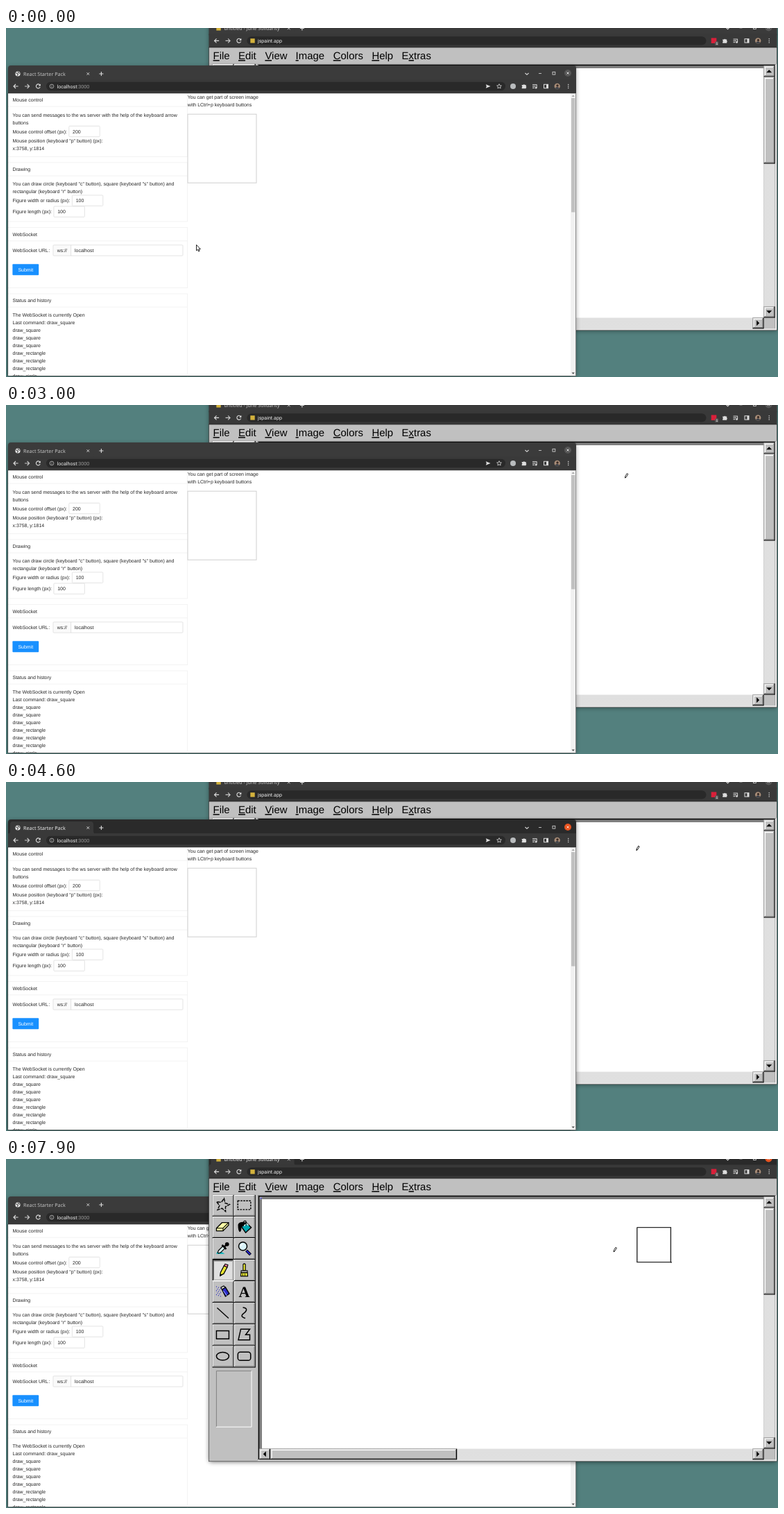
An HTML page that plays this animation: 1113x503 px, repeating every 8000 ms.

```html
<!DOCTYPE html>
<html lang="en">
<head>
<meta charset="utf-8">
<title>Remote drawing</title>
<style>
html, body { margin: 0; width: 100%; height: 100%; overflow: hidden; background: #53807e; }
svg { display: block; width: 1113px; height: 503px; }
text { font-family: "Liberation Sans", Arial, sans-serif; text-rendering: geometricPrecision; white-space: pre; }
.ui { font-family: "Noto Sans", sans-serif; }
.url { font-family: Roboto, sans-serif; }
.letter { font: bold 22px "Liberation Serif", serif; }
.strip, .tab { fill: #3b3b3b; }
.title { fill: #c4c4c4; }
.close { fill: #585858; }
.shade { opacity: .35; }
.on .strip { fill: #2a2a2a; }
.on .tab { fill: #393939; }
.on .title { fill: #eee; }
.on .close { fill: #e95420; }
.on .shade { opacity: .5; }
</style>
</head>
<body>
<svg id="stage" viewBox="0 0 1113 503" xmlns="http://www.w3.org/2000/svg"></svg>
<script>
const rect = (x, y, w, h, fill, more = '') =>
  `<rect x="${x}" y="${y}" width="${w}" height="${h}" fill="${fill}" ${more}/>`;
const frame = (x, y, w, h, color, sw = 1, more = '') =>
  rect(x, y, w, h, 'none', `stroke="${color}" stroke-width="${sw}" ${more}`);
const path = (d, stroke = '#000', sw = 1, fill = 'none', more = '') =>
  `<path d="${d}" stroke="${stroke}" stroke-width="${sw}" fill="${fill}" ${more}/>`;
const shape = (d, fill, more = '') => path(d, 'none', 0, fill, more);
const circle = (x, y, r, fill, more = '') =>
  `<circle cx="${x}" cy="${y}" r="${r}" fill="${fill}" ${more}/>`;
const label = (x, y, s, size = 6.97, fill = '#262626', more = '') =>
  `<text x="${x}" y="${y}" font-size="${size}" fill="${fill}" ${more}>${s}</text>`;
const at = (x, y, body) => `<g transform="translate(${x} ${y})">${body}</g>`;

// ---- browser chrome; origin: left edge, middle of the address row ----
function chrome(title, host, port, favicon, siteIcon, extension, extra) {
  const light = '#dedede';
  const puzzle = shape('M-3 -2H-1A1.2 1.2 0 0 1 1.2 -2H3V0A1.2 1.2 0 0 1 3 2V3.3H-3V1.6A1.2 1.2 0 0 0 -3 -.4Z', light);
  const list = path('M-3.5 -2.3H3M-3.5 0H1M-3.5 2.3H-.5', light) + path('M2.6 -2V2.2', light) + circle(1.6, 2.2, 1.3, light);
  const panel = frame(-3, -2.7, 6, 5.4, light, 1) + rect(.5, -2.7, 2.5, 5.4, light);
  const avatar = circle(0, 0, 4.2, '#a88d78') + circle(.3, -1, 1.7, '#3a2c26') + shape('M-3.2 2.7Q0 -.8 3.2 2.7Q0 5.5 -3.2 2.7', '#3a3f48');
  const dots = [-2.6, 0, 2.6].map(y => circle(0, y, .75, light)).join('');
  return '<path class="strip" d="M0 -8V-26Q0 -30 4 -30H815Q819 -30 819 -26V-8Z"/>'
    + '<path class="tab" d="M0 -9Q3 -10 3 -13V-23Q3 -27 7 -27H119Q123 -27 123 -23V-13Q123 -10 126 -9Z"/>'
    + at(14, -18, favicon)
    + `<text class="ui title" x="22" y="-15.5" font-size="7.15">${title}</text>`
    + path('M113.5 -19.8L117.1 -16.2M117.1 -19.8L113.5 -16.2', light, .9)
    + path('M131.4 -18H137.4M134.4 -21V-15', light, 1.1)
    + path('M745.5 -19L748 -16.7L750.5 -19', light, 1.1)
    + path('M765 -18.5H769', light, .8) + frame(785, -20.7, 3.8, 3.8, light, .8)
    + '<circle class="close" cx="807" cy="-19" r="5"/>'
    + path('M805.5 -20.5L808.5 -17.5M808.5 -20.5L805.5 -17.5', '#fff', .8)
    + rect(0, -10, 819, 20, '#393939')
    + rect(55, -6.2, 662, 12.4, '#292929', 'rx="6.2"')
    + path('M14.6 0H8M11 -3L8 0L11 3', light, 1.1)
    + path('M24 0H30.6M27.6 -3L30.6 0L27.6 3', '#c8c8c8', 1.1)
    + path('M45.9 -1.8A3 3 0 1 0 46.2 1', light, 1.1) + shape('M46.8 -3.6V-.5H43.7Z', light)
    + at(63, 0, siteIcon)
    + label(70.5, 2.5, `${host}<tspan fill="#9a9a9a">${port}</tspan>`, 7.1, '#eee', 'class="url"')
    + extra
    + at(728, 0, extension) + at(743.7, 0, puzzle) + at(759.5, 0, list)
    + at(775.5, 0, panel) + at(791.7, 0, avatar) + at(807.7, 0, dots);
}

const shadow = (x, y, w, h) => rect(x, y, w, h, '#000', 'rx="4" class="shade" filter="url(#blur)"');

// ---- page window ----
const card = (y, h, name) => frame(2.5, y, 259.2, h, '#f0f0f0', .8)
  + path(`M3 ${y + 19.2}H261.7`, '#f0f0f0', .8) + label(9.5, y + 12.4, name);
const input = (x, y, w, s) => frame(x, y, w, 15.4, '#d9d9d9', .7, 'rx="1"') + label(x + 5.3, y + 10.2, s);

function pageWindow() {
  const globe = circle(0, 0, 3.6, '#e8e8e8')
    + path('M-2.8 -1.2L-.8 -.6L.4 1L-1 2.6M.2 -3L1 -1.4L3 -.8', '#444', 1.1);
  const info = circle(0, 0, 2.9, 'none', 'stroke="#bbb" stroke-width=".8"') + path('M0 -.4V1.6M0 -1.7V-1', '#bbb', .8);
  const extra = shape('M688.8 -2.8L695.6 0L688.8 2.8L689.8 0Z', '#dedede')
    + path('M708 -3.4L709 -1.1L711.4 -.9L709.6 .7L710.1 3L708 1.8L705.9 3L706.4 .7L704.6 -.9L707 -1.1Z', '#dedede', .8);
  const rows = [
    [127.5, 'You can send messages to the ws server with the help of the keyboard arrow'],
    [138.5, 'buttons'], [151.6, 'Mouse control offset (px):'],
    [165.1, 'Mouse position (keyboard "p" button) (px):'], [176.1, 'x:3758, y:1814'],
    [227, 'You can draw circle (keyboard "c" button), square (keyboard "s" button) and'],
    [238, 'rectangular (keyboard "r" button)'], [251.2, 'Figure width or radius (px):'],
    [267.2, 'Figure length (px):'], [322.9, 'WebSocket URL'],
    [416, 'The WebSocket is currently Open'], [427, 'Last command: draw_square']];
  return shadow(3, 56, 819, 447)
    + '<g clip-path="url(#pageClip)">'
    + rect(3, 90, 819, 412, '#fff')
    + card(93.9, 91.4, 'Mouse control') + card(193.9, 85, 'Drawing')
    + card(287.6, 87, 'WebSocket') + card(383, 140, 'Status and history')
    + rows.map(([y, s]) => label(9.5, y, s)).join('')
    + label(61.8, 322.9, ':')
    + input(90.8, 141.3, 44.4, '200') + input(95.4, 241, 44.4, '100') + input(68.9, 257, 44.4, '100')
    + rect(68, 312.8, 25.6, 15.4, '#fafafa') + frame(68, 312.8, 187, 15.4, '#d9d9d9', .7, 'rx="1"')
    + path('M93.6 312.8V328.2', '#d9d9d9', .7) + label(73.7, 322.9, 'ws://') + label(99, 322.9, 'localhost')
    + rect(9.4, 340.2, 37.8, 16, '#1890ff', 'rx="1"') + label(17.4, 350.7, 'Submit', 7, '#fff')
    + '<g id="history"></g>'
    + label(261.8, 102, 'You can get part of screen image') + label(261.8, 113, 'with LCtrl+p keyboard buttons')
    + frame(262, 124.2, 99, 99, '#cfcfcf', 1)
    + rect(814, 94, 8, 408, '#f1f1f1') + rect(815, 101, 5.4, 164.5, '#c1c1c1')
    + shape('M815.6 99L817.7 96.6L819.8 99Z', '#a3a3a3')
    + shape('M815.6 496.6L817.7 499L819.8 496.6Z', '#505050')
    + '</g>'
    + at(3, 84, chrome('React Starter Pack', 'localhost', ':3000', globe, info, circle(0, 0, 4, '#b9bcbe'), extra))
    + frame(2.8, 94, 818.8, 407.8, '#2b2b2b', .5);
}

// ---- paint window ----
const px = 1.244; // one pixel of the enlarged paint interface

// nested boxes: low edge, top edge, inner low edge, inner top edge, face
function bevel(x, y, w, h, colors) {
  const [low, top, low2, top2, face] = colors;
  return rect(x, y, w, h, low) + rect(x, y, w - px, h - px, top)
    + rect(x + px, y + px, w - 2 * px, h - 2 * px, low2) + rect(x + px, y + px, w - 3 * px, h - 3 * px, top2)
    + rect(x + 2 * px, y + 2 * px, w - 4 * px, h - 4 * px, face);
}
const gray = '#c0c0c0', raisedTool = ['#000', '#fff', '#808080', gray, gray];
const pressedTool = ['#fff', '#000', gray, '#808080', 'url(#check)'];
const raisedBar = ['#000', '#dfdfdf', '#808080', '#fff', gray];
const bar = (x, y, w, h, turn) => bevel(x, y, w, h, raisedBar)
  + (turn ? at(x + w / 2 - .4, y + h / 2 - .3, shape('M-4 2L0 -2L4 2Z', '#000', `transform="rotate(${turn})"`)) : '');

function starPath(n, R, r) {
  let d = '';
  for (let i = 0; i < 2 * n; i++) {
    const a = i * Math.PI / n - Math.PI / 2 + .2, k = i % 2 ? r : R;
    d += (i ? 'L' : 'M') + (k * Math.cos(a)).toFixed(1) + ' ' + (k * Math.sin(a)).toFixed(1);
  }
  return d + 'Z';
}

const k = '#000';
let spray = '';
for (let i = 0; i < 13; i++) spray += rect(-9.5 + (i * 7 % 5) * 1.5, -7.5 + i * 1.15, 1.1, 1.1, '#2020c0');
const tools = [
  path(starPath(5, 10, 4.6), k, 1.4, 'none', 'stroke-dasharray="5 1.2"'),
  frame(-9.3, -6.3, 18.6, 12.6, k, 1.4, 'stroke-dasharray="2.6 1.4"'),
  path('M-9 2L-1 -6H8.5V-2.5L.5 6H-9Z', k, 1.3, '#ffffa6') + path('M-9 2H.5L8.5 -6M.5 2V6', k, 1.1),
  path('M-4 0L3 -6L10 1L2 8.5Z', k, 1.5, '#00a8b0') + path('M-1 -1L3.5 -4.5L6 -2', '#d8f4f4', 1.5)
    + shape('M-9 -3Q-8 -7 -2 -7L3 -6L-4 0Q-4 7 -6.5 7.5Q-9 6 -9 -3Z', k) + path('M-1 -1V-7Q0 -9.5 2.5 -8V-2', k, 1.1),
  shape('M-9 8H3L-2 5H-8Z', '#00b5bd') + path('M-7 6L-6 3L1 -4L4 -1L-3 6L-6 7Z', k, 1.2, '#d8f4f4')
    + path('M-1 -5L5 1M2 -2L7 -7', k, 2.4) + circle(6.3, -6, 2.9, k),
  path('M3 3L9 9', k, 4) + path('M3.4 3.4L8.6 8.6', '#2525d8', 2)
    + circle(-2, -3, 6, '#d9f3f8', 'stroke="#000" stroke-width="1.5"') + path('M-5 -3Q-4.5 -6 -2 -6', '#fff', 1.3),
  path('M-3.5 8L-3 3.5L2 -6L6.5 -4L1.5 5.5Z', k, 1.3, '#ffff3c') + path('M2 -6L3.4 -8.6L7.6 -7.2L6.5 -4Z', k, 1.1, '#ef7fa0')
    + path('M-.8 5.5L4 -4.6', '#b9a91d', .8) + shape('M-4.2 9.5L-3.8 5.5L-.4 7Z', k),
  path('M-1.6 1V-8Q0 -10 1.6 -8V1Z', k, 1.2, '#ffff3c') + rect(-4.5, 1, 9, 3, '#b8b8b8', 'stroke="#000" stroke-width="1.1"')
    + path('M-4.5 4H4.5L5 9H-5Z', k, 1.2, '#ffff3c') + path('M-2 5V9M1 5V9', k, .9),
  spray + path('M-1 -3L4 -6L9.5 3L4 7Z', k, 1.4, '#2a2ac8') + path('M1 -1L6 6', '#8f9cf5', 1.2)
    + path('M-2.5 -6L1.5 -8L4 -6L-1 -3Z', k, 1.1, '#d8d8d8'),
  '<text class="letter" y="7.6" text-anchor="middle">A</text>',
  path('M-8 -7.5L8.5 7.5', k, 1.4),
  path('M-2 -8Q4 -7.5 3 -4Q2 -1.5 -1 .5Q-5 3.5 -2.5 5.5Q-.5 7 1.5 7.5', k, 1.5),
  frame(-9, -5.6, 18, 11.6, k, 1.5),
  path('M-5 -8H8L2 0H8V7.5H-8.5Z', k, 1.5),
  '<ellipse rx="9" ry="5.8" fill="none" stroke="#000" stroke-width="1.5"/>',
  frame(-9.2, -6, 18.4, 12, k, 1.5, 'rx="3.4"')];

function paintWindow() {
  const mark = rect(-3.2, -3.2, 6.4, 6.4, '#d3b23c');
  const ext = rect(-3.8, -4, 7.6, 7.6, '#d9203a') + rect(1.6, 1, 5, 5.6, '#5c5c5c', 'rx="1"')
    + label(2.9, 5.7, '1', 5, '#fff');
  const menu = [[298.6, 'File'], [335, 'Edit'], [373.4, 'View'], [417.6, 'Image'],
    [471.8, 'Colors'], [527.4, 'Help'], [570.6, 'Extras', 1]];
  const menuText = menu.map(([x, s, i = 0]) => label(x, 45.1, s.slice(0, i)
    + `<tspan text-decoration="underline">${s[i]}</tspan>` + s.slice(i + 1), 12 * px, '#000')).join('');
  const size = 25 * px;
  const buttons = tools.map((icon, i) => {
    const x = 297.6 + i % 2 * size, y = 51.8 + (i >> 1) * size;
    return bevel(x, y, size, size, i === 6 ? pressedTool : raisedTool) + at(x + 14.8, y + 14.8, icon);
  }).join('');
  return shadow(292.5, -20, 819, 457)
    + rect(292.5, 26, 819, 410, gray)
    + at(292.5, 18.4, chrome('untitled - June Solidarity', 'jspaint.app', '', mark, mark, ext, ''))
    + menuText + buttons
    + path('M303.4 386V305.4H354', '#808080', 1) + path('M354 305.4V386.2H303', '#fff', 1)
    + bevel(362.7, 51.8, 748.5, 383.6, ['#fff', '#808080', '#dfdfdf', '#000', '#808080'])
    + rect(369, 58, 723.5, 360, '#fff')
    + rect(366, 55, 3, 3, '#fff') + rect(366.6, 55.6, 2, 2, '#000080')
    + rect(1092.5, 54.4, 16.2, 363, 'url(#check)') + rect(365.2, 417.6, 727.3, 15.8, 'url(#check)')
    + rect(1092.5, 417.6, 16.2, 15.4, gray)
    + bar(1092.5, 54.4, 16.2, 16.2, 360) + bar(1092.5, 70.8, 16.2, 124.8) + bar(1092.5, 401.4, 16.2, 16.2, 180)
    + bar(365.2, 417.6, 16, 15.8, 270) + bar(381.2, 417.6, 269, 15.8) + bar(1076.4, 417.6, 16.2, 15.8, 90)
    + frame(292.5, 27, 818.8, 408.8, '#2b2b2b', .6)
    + path('M909.8 98.6H958.4V148.6H909.8V98.6', '#2a2a2a', 1.4, 'none', 'id="square"')
    + path('M957.8 148.9H960', '#2a2a2a', 1.3, 'none', 'id="nub"');
}

const stage = document.getElementById('stage');
stage.innerHTML = `<defs>
  <filter id="blur" x="-5%" y="-5%" width="110%" height="110%"><feGaussianBlur stdDeviation="3"/></filter>
  <clipPath id="pageClip"><rect x="3" y="56" width="818.6" height="445.6"/></clipPath>
  <pattern id="check" width="2" height="2" patternUnits="userSpaceOnUse">${rect(0, 0, 2, 2, '#fff')
    + rect(0, 0, 1, 1, gray) + rect(1, 1, 1, 1, gray)}</pattern></defs>`
  + rect(0, 0, 1113, 503, '#53807e')
  + `<g id="paint">${paintWindow()}</g><g id="page">${pageWindow()}</g><g id="cursor">`
  + path('M.5 .5V8.9L2.4 7.2L3.7 10L5.1 9.4L3.8 6.7H6.4Z', '#111', .9, '#fff', 'id="arrow"')
  + '<g id="pencil">' + path('M.6 7L.9 4.6L3.3 .6L4.8 1.5L2.5 5.6Z', '#111', .9, '#fff')
  + shape('M.2 7.6L.5 5.2L2.2 6.2Z', '#111') + '</g></g>';

const $ = id => document.getElementById(id);
const [paint, page, cursor, arrow, pencil, square, nub, history] =
  ['paint', 'page', 'cursor', 'arrow', 'pencil', 'square', 'nub', 'history'].map($);

// time, x, y of the pointer (top left)
const moves = [[0, 274, 312], [700, 372, 308], [800, 470, 304], [1900, 475, 304.3], [2000, 545, 276],
  [2100, 660, 222], [2200, 800, 150], [2300, 925, 92], [2400, 970, 72], [2500, 914, 87], [3000, 892, 98],
  [3700, 770, 160], [3800, 500, 275], [3900, 330, 332], [4100, 450, 290], [4200, 783, 181.5],
  [4400, 850, 138], [4500, 916, 100], [4600, 908.4, 91.5], [7700, 900, 102], [7800, 882, 120], [7900, 875.6, 126.7]];
// time, length of outline drawn
const strokes = [[0, 0], [5300, 24], [5400, 48.6], [5500, 88], [5600, 126], [5800, 147.2], [5900, 173], [6000, 200]];
const last = (list, t) => list.filter(s => s[0] <= t).pop();

function show(el, on) { el.setAttribute('visibility', on ? 'visible' : 'hidden'); }

let step = -1;
function draw(t) {
  const raised = t >= 5100, done = t >= 6200, drawn = last(strokes, t)[1];
  stage.append(raised ? paint : page, cursor);
  page.setAttribute('class', t >= 4100 && !raised ? 'on' : '');
  paint.setAttribute('class', raised ? 'on' : '');

  square.setAttribute('stroke-dasharray', `${drawn} 300`);
  show(square, drawn > 0);
  show(nub, done);

  let [, x, y] = last(moves, t);
  if (t >= 5300 && t < 7700) {
    const p = square.getPointAtLength(drawn);
    x = p.x - .8;
    y = p.y - 6.8;
  }
  const overPaint = raised || x > 821;
  show(arrow, !overPaint);
  show(pencil, overPaint);
  cursor.setAttribute('transform', `translate(${x} ${y})`);

  const log = [...Array(done ? 4 : 3).fill('square'), ...Array(3).fill('rectangle'), 'circle'];
  history.innerHTML = log.map((s, i) => label(9.5, 438 + 11 * i, 'draw_' + s)).join('');
}

function tick() {
  const now = Math.floor(performance.now() % 8000 / 100);
  if (now !== step) draw((step = now) * 100);
  requestAnimationFrame(tick);
}
tick();
</script>
</body>
</html>
```
